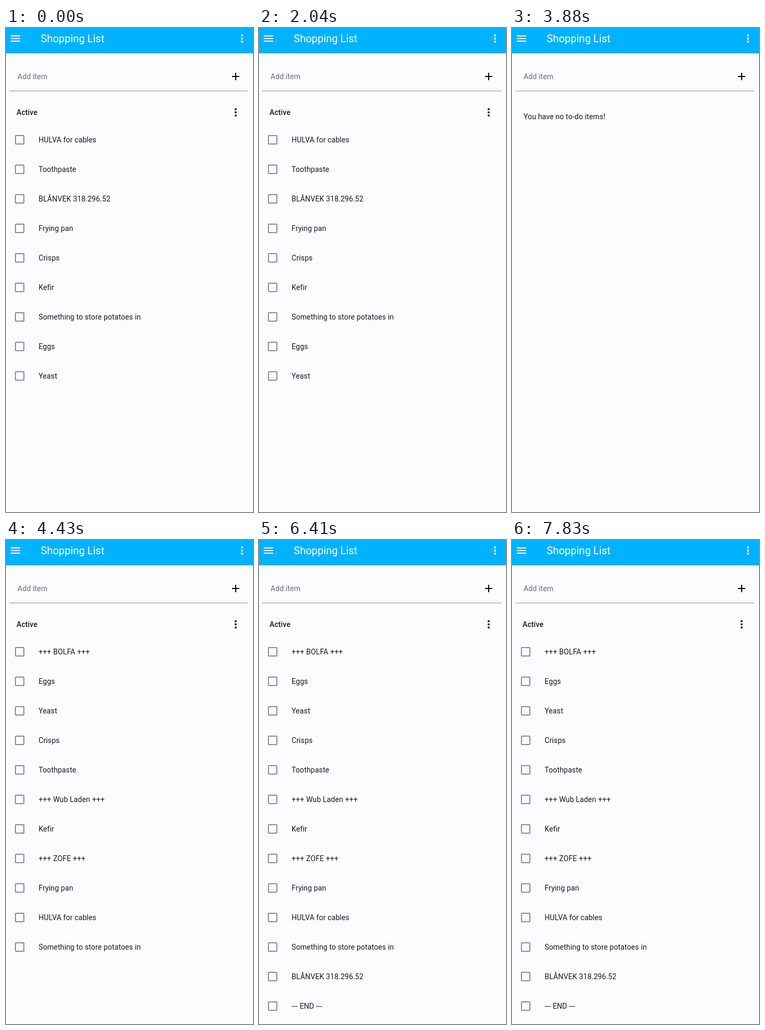
Recreate the animation shown at these times as an HTML page. Size 470 by 918 pixels, loop 7850 ms.

```html
<!DOCTYPE html>
<html lang="en">
<head>
<meta charset="utf-8">
<title>Shopping List</title>
<style>
  html, body { margin: 0; width: 470px; height: 918px; overflow: hidden; background: #fcfcff; }
  svg { display: block; }
  text { font: 14px Roboto, sans-serif; letter-spacing: .1px; fill: #18181d; }
  .title { font-size: 20px; letter-spacing: 0; fill: #fff; }
  .hint { fill: #6a6780; }
  .heading { font-weight: 500; }
  .box { fill: none; stroke: #8b88a7; stroke-width: 2; }
</style>
</head>
<body>
<svg width="470" height="918" viewBox="0 0 470 918">
  <defs>
    <g id="dots"><circle cy="-6" r="2"/><circle r="2"/><circle cy="6" r="2"/></g>
  </defs>
  <rect width="470" height="48" fill="#00b2ff"/>
  <rect y="47" width="470" height="1" fill="#00a4ec"/>
  <path d="M9 15h18M9 20h18M9 25h18" stroke="#fff" stroke-width="2"/>
  <text class="title" x="66" y="27">Shopping List</text>
  <use href="#dots" x="449" y="20" fill="#fff"/>
  <text class="hint" x="22" y="97">Add item</text>
  <path d="M430 92h14M437 85v14" stroke="#000" stroke-width="2"/>
  <rect x="6" y="119" width="455" height="1" fill="#8e8d98"/>
  <g id="active">
    <text class="heading" x="20" y="165">Active</text>
    <use href="#dots" x="437" y="160" fill="#18181d"/>
  </g>
  <text id="empty" x="22" y="173">You have no to-do items!</text>
  <g id="rows"></g>
</svg>
<script>
const LOOP = 7850, ROW = 56;
const unsorted = ['HULVA for cables', 'Toothpaste', 'BLÅNVEK 318.296.52', 'Frying pan', 'Crisps',
  'Kefir', 'Something to store potatoes in', 'Eggs', 'Yeast'];
const sorted = ['+++ BOLFA +++', 'Eggs', 'Yeast', 'Crisps', 'Toothpaste', '+++ Wub Laden +++', 'Kefir',
  '+++ ZOFE +++', 'Frying pan', 'HULVA for cables', 'Something to store potatoes in',
  'BLÅNVEK 318.296.52', '--- END ---'];
const removeTimes = [2940, 3040, 3220, 3320, 3430, 3540, 3650, 3760, 3870];
const ADD_START = 4020, ADD_STEP = 40;

const byId = id => document.getElementById(id);
const show = (id, on) => byId(id).style.display = on ? '' : 'none';
let shown;

function itemsAt(t) {
  if (t < ADD_START) return unsorted.slice(removeTimes.filter(r => t >= r).length);
  return sorted.slice(0, Math.floor((t - ADD_START) / ADD_STEP) + 1);
}

function row(label, i) {
  return `<g transform="translate(0 ${212 + i * ROW})">
    <rect class="box" x="18" y="-8" width="16" height="16" rx="1"/>
    <text x="62" y="5">${label}</text></g>`;
}

function draw(now) {
  const items = itemsAt(now % LOOP), key = items.join();
  if (key !== shown) {
    shown = key;
    byId('rows').innerHTML = items.map(row).join('');
    show('active', items.length);
    show('empty', !items.length);
  }
  requestAnimationFrame(draw);
}
draw(performance.now());
</script>
</body>
</html>
```
